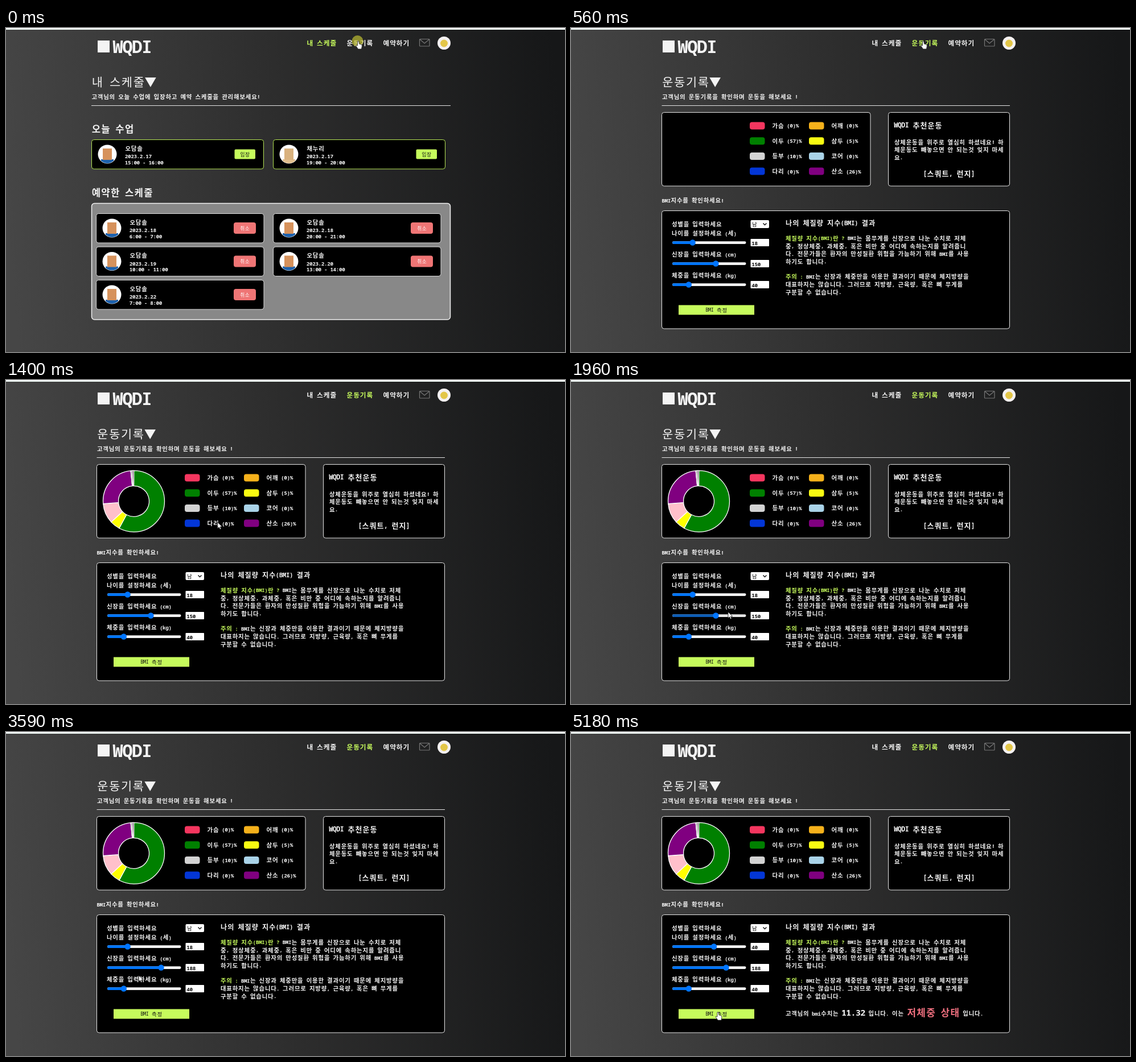
An HTML page with a canvas that plays this animation: 982 by 570 pixels, repeating every 5310 ms.

```html
<!DOCTYPE html>
<html lang="ko">
<head>
<meta charset="utf-8">
<title>운동기록</title>
<style>
html, body { margin: 0; width: 100%; height: 100%; overflow: hidden; background: #2c2c2c; }
canvas { display: block; width: 982px; height: 570px; }
</style>
</head>
<body>
<canvas id="stage" width="982" height="570"></canvas>
<script>
const LOOP = 5310, LOADED = 560;
const LIME = '#c6fb5c', WHITE = '#f4f4f4', BLUE = '#0075ff', EDGE = '#e6e6e6';
const CJK = '"Noto Sans Mono CJK KR", "Noto Sans CJK KR", "Noto Sans CJK", sans-serif';
const MONO = '"Noto Sans Mono", "DejaVu Sans Mono", monospace';
const BRAND = 'WQDI';
const ctx = document.getElementById('stage').getContext('2d');

// ---------- helpers ----------
// Text on a cell grid: wide glyphs take one cell, Latin half a cell. Returns the end x.
function text(s, x, cy, cell = 10.4, color = WHITE, weight = cell < 20 ? 700 : 400) {
  ctx.fillStyle = color;
  ctx.textAlign = 'center';
  for (const ch of s) {
    const wide = ch > '\u2000';
    const step = wide ? cell : cell / 2;
    ctx.font = wide ? `${weight} ${cell}px ${CJK}` : `${weight} ${cell * 0.9}px ${MONO}`;
    ctx.fillText(ch, x + step / 2, cy + cell * (wide ? 0.37 : 0.33));
    x += step;
  }
  return x;
}

function lines(rows, x, cy, gap) {
  rows.forEach((row, i) => text(row, x, cy + i * gap));
}

function rect(x, y, w, h, fill) {
  ctx.fillStyle = fill;
  ctx.fillRect(x, y, w, h);
}

function box(x, y, w, h, r, fill, stroke, line = 1) {
  ctx.beginPath();
  ctx.roundRect(x, y, w, h, r);
  if (fill) { ctx.fillStyle = fill; ctx.fill(); }
  if (stroke) { ctx.strokeStyle = stroke; ctx.lineWidth = line; ctx.stroke(); }
}

function disc(x, y, r, fill) {
  ctx.beginPath();
  ctx.arc(x, y, r, 0, Math.PI * 2);
  ctx.fillStyle = fill;
  ctx.fill();
}

function shape(d, fill, stroke, line = 1) {
  const p = new Path2D(d);
  if (fill) { ctx.fillStyle = fill; ctx.fill(p); }
  ctx.strokeStyle = stroke;
  ctx.lineWidth = line;
  ctx.stroke(p);
}

// ---------- shared chrome ----------
function backdrop() {
  const g = ctx.createLinearGradient(0, 330, 982, 240);
  g.addColorStop(0, '#464646');
  g.addColorStop(0.5, '#2d2d2d');
  g.addColorStop(1, '#161718');
  rect(0, 0, 982, 570, g);
  rect(0, 0, 982, 3, '#f0faf5');
}

function header(active) {
  rect(161, 22, 21, 21, WHITE);
  text(BRAND, 188, 33, 34, WHITE, 900);
  [['내 스케줄', 528], ['운동기록', 598], ['예약하기', 662]].forEach(([label, x], i) =>
    text(label, x, 26.5, 11.7, i === active ? LIME : WHITE));
  box(726.5, 19.5, 17.5, 12.5, 1, null, '#777', 1.2);
  shape('M727 20l8.2 7 8.3-7', null, '#777', 1.2);
  disc(769.5, 26.5, 11.5, '#f5f1f1');
  disc(769.5, 27, 6.5, '#e3c648');
}

function heading(title, sub, x, right) {
  text(title, x, 95, 20.8);
  text(sub, x, 121);
  rect(x, 136, right - x, 1, '#e4e4e4');
}

// ---------- schedule page ----------
function portrait(x, y, skin, shirt) {
  disc(x, y, 16.5, '#fff');
  ctx.save();
  ctx.beginPath();
  ctx.arc(x, y, 16, 0, 7);
  ctx.clip();
  rect(x - 11, y + 9, 22, 8, shirt);
  rect(x - 8, y - 10, 16, 20, skin);
  ctx.restore();
}

function lesson(x, y, w, who, date, hours, opt) {
  box(x + 0.5, y + 0.5, w, 51.5, 4, '#000', opt.edge);
  const face = x + opt.inset, btn = x + w - opt.bw - opt.pad;
  if (who === '오담솔') portrait(face, y + 26, '#d6925c', '#1e62ad');
  else portrait(face, y + 26, '#d9b27e', '#e2bf8e');
  text(who, face + 31, y + 16);
  text('2023.2.' + date, face + 31, y + 30);
  text(hours, face + 31, y + 40.5);
  box(btn, y + 26 - opt.bh / 2, opt.bw, opt.bh, opt.r, opt.color);
  text(opt.label, btn + opt.bw / 2 - 8.7, y + 26.5, 8.7, opt.ink, 400);
}

function schedulePage() {
  backdrop();
  header(0);
  heading('내 스케줄▼', '고객님의 오늘 수업에 입장하고 예약 스케줄을 관리해보세요!', 150, 781);
  text('오늘 수업', 150, 178, 16.64);
  const enter = { edge: '#b5e455', inset: 28, pad: 14, bw: 36.5, bh: 17, r: 2, color: LIME, label: '입장', ink: '#111' };
  lesson(150, 196, 302, '오담솔', '17', '15:00 - 16:00', enter);
  lesson(469, 196, 302, '채누리', '17', '19:00 - 20:00', enter);

  text('예약한 스케줄', 150, 290, 16.64);
  box(150.5, 308.5, 630, 204.5, 5, '#888', '#f0f0f0', 1.5);
  const cancel = { edge: '#dcdcdc', inset: 28, pad: 13.5, bw: 39, bh: 20, r: 4, color: '#ef7575', label: '취소', ink: '#fff' };
  [['18', '6:00 - 7:00'], ['18', '20:00 - 21:00'], ['19', '10:00 - 11:00'],
    ['20', '13:00 - 14:00'], ['22', '7:00 - 8:00']].forEach(([day, hours], i) =>
    lesson(i % 2 ? 469 : 158, 326 + (i >> 1) * 58.5, 294.5, '오담솔', day, hours, cancel));
}

// ---------- record page ----------
function donut(t) {
  const u = Math.min(1, (t - LOADED) / 900);
  const grow = 1 - Math.pow(1 - u, 4.4);
  if (grow < 0.02) return;
  const slices = { green: 11, yellow: 1, pink: 2, purple: 4.7, gray: 0.15, '#4b2a4b': 0.15 };
  const turn = Math.PI * 2 * grow / 19;
  let a = -Math.PI / 2;
  ctx.strokeStyle = '#fff';
  ctx.lineWidth = 1.3;
  for (const [color, count] of Object.entries(slices)) {
    const b = a + count * turn;
    ctx.beginPath();
    ctx.arc(224.5, 213.3, 54, a, b);
    ctx.arc(224.5, 213.3, 27, b, a, true);
    ctx.closePath();
    ctx.fillStyle = color;
    ctx.fill();
    ctx.stroke();
    a = b;
  }
}

function chartPanel(t, ready) {
  box(159.5, 148.5, 366.5, 129.5, 4, '#000', EDGE);
  const legend = [['가슴', 0, '#f4365f'], ['어깨', 0, '#f5b11b'], ['이두', 57, 'green'], ['삼두', 5, '#f8fb12'],
    ['등부', 10, ready ? 'lightgray' : '#f0c4ca'], ['코어', 0, '#a9d3e8'], ['다리', 0, '#0336d6'], ['산소', 26, 'purple']];
  legend.forEach(([name, share, color], i) => {
    const x = 314 + (i % 2) * 104, cy = 172 + (i >> 1) * 26.7;
    box(x, cy - 6.5, 26.5, 13, 4, color);
    text(ready ? `${name} (${share})%` : name, x + 39, cy, 10.5);
  });
  if (ready) donut(t);
}

function advicePanel(ready) {
  const [done, next] = ready ? '상하' : '하상';
  box(557.5, 148.5, 213, 129.5, 4, '#000', EDGE);
  text(BRAND + ' 추천운동', 567.5, 171, 13);
  lines([`${done}체운동을 위주로 열심히 하셨네요! ${next}`, '체운동도 빼놓으면 안 되는것 잊지 마세', '요.'], 567.5, 201, 13.5);
  if (ready) text('[스쿼트, 런지]', 618.5, 256, 13);
  else text('[팔굽혀펴기, 풀업]', 605.5, 256, 13);
}

function slider(label, cy, value, max, hover) {
  text(label, 176.5, cy - 16);
  const x = 183 + value / max * 119;
  box(178, cy - 2.2, 129.5, 4.6, 2.3, hover ? '#e4e4e4' : '#f2f2f2');
  box(178, cy - 2.2, x - 178, 4.6, 2.3, hover ? '#0b5cb5' : BLUE);
  disc(x, cy, 5.2, BLUE);
  box(315.5, cy - 6.5, 32.5, 13, 1, '#fff');
  text(String(value), 317.5, cy + 1, 10.4, '#111');
}

function bmiPanel(t, mouse) {
  box(159.5, 321.5, 611, 207.5, 4, '#000', EDGE);
  text('성별을 입력하세요', 176.5, 345);
  box(315.5, 338, 32.5, 14, 2, '#fff');
  text('남', 317.5, 345, 9.5, '#111', 400);
  shape('M337.5 343.5l3 3 3-3', null, '#111', 1.5);

  const over = cy => t > 1400 && mouse.x > 178 && mouse.x < 308 && Math.abs(mouse.y - cy) < 8;
  const dragged = ([from, to], idle, max) =>
    t < from ? idle : Math.round((path(Math.min(t, to)).x - 183) / 119 * max);
  slider('나이를 설정하세요 (세)', 377.5, dragged([3790, 4060], 18, 70), 70, over(377.5));
  slider('신장을 입력하세요 (cm)', 414.5, dragged([2290, 2690], 150, 250), 250, over(414.5));
  slider('체중을 입력하세요 (kg)', 451.5, 40, 200, over(451.5));
  rect(189, 487.5, 133, 17, LIME);
  text('BMI 측정', 236.5, 496, 9.5, '#111', 400);

  const x = 376.5;
  text('나의 체질량 지수(BMI) 결과', x, 343, 12.17);
  text(' BMI는 몸무게를 신장으로 나눈 수치로 저체', text('체질량 지수(BMI)란 ?', x, 370, 10.4, LIME), 370);
  lines(['중, 정상체중, 과체중, 혹은 비만 중 어디에 속하는지를 알려줍니',
    '다. 전문가들은 환자의 만성질환 위험을 가늠하기 위해 BMI를 사용', '하기도 합니다.'], x, 383.7, 13.6);
  text(' BMI는 신장과 체중만을 이용한 결과이기 때문에 체지방량을', text('주의 :', x, 437.5, 10.4, LIME), 437.5);
  lines(['대표하지는 않습니다. 그러므로 지방량, 근육량, 혹은 뼈 무게를', '구분할 수 없습니다.'], x, 451.2, 13.6);

  if (t >= 5040) {
    let end = text('고객님의 bmi수치는 ', x, 495.5);
    end = text('11.32', end, 494, 16.64);
    end = text(' 입니다. 이는 ', end, 495.5);
    end = text('저체중 상태', end, 494, 16.9, '#f0707f');
    text(' 입니다.', end, 495.5);
  }
}

// ---------- loading ghost, built from rows of square pixels ----------
const PX = 4;
const snap = v => Math.round(v / PX) * PX;
const span = (a, b, y, fill) => rect(snap(a), y, snap(b) - snap(a), PX, fill);

function oval(cx, cy, rx, ry, fill) {
  for (let y = snap(cy - ry); y < cy + ry; y += PX) {
    const half = rx * Math.sqrt(Math.max(0, 1 - ((y + PX / 2 - cy) / ry) ** 2));
    span(cx - half, cx + half, y, fill);
  }
}

// Left and right edge of the ghost: round head, raised arm, widening train.
function ghostEdges(y) {
  if (y < 254) {
    const half = 43 * Math.sqrt(Math.max(0.1, 1 - ((254 - y) / 48) ** 2));
    return [455 - half, 455 + half];
  }
  const arm = y < 292 ? 19 * Math.sqrt(Math.sin(Math.PI * (y - 252) / 42)) : 0;
  return [407 + (y - 254) / 18 - arm, 498 + 39 * ((y - 254) / 92) ** 2.2];
}

function ghost(bob) {
  const ink = '#666';
  ctx.save();
  ctx.translate(0, bob);
  for (let y = 208; y < 348; y += PX) {
    const [l, r] = ghostEdges(y);
    const [l0, r0] = ghostEdges(Math.max(208, y - PX));
    const front = r - 18 - (y - 208) / 5;
    span(l, r, y, y === 208 || y === 344 ? ink : '#c8c8c8');
    if (y > 208 && y < 344) {
      span(l, front, y, '#fff');
      span(Math.min(l, l0 - PX), Math.max(l, l0) + PX, y, ink);
      span(Math.min(r, r0) - PX, r, y, ink);
    }
  }
  rect(408, 256, PX, 32, '#bbb');
  oval(470, 268, 20, 14, ink);
  oval(470, 269, 16, 10, '#fff');
  for (let y = 276; y < 312; y += PX) {
    span(460 + (y - 276) / 4, 476, y, '#d8d8d8');
    span(458 + (y - 276) / 4, 462 + (y - 276) / 4, y, ink);
  }
  rect(412, 324, 32, 20, ink);
  rect(416, 328, 24, 8, '#999');
  rect(420, 236, 10, 12, '#000');
  rect(444, 236, 10, 12, '#000');
  rect(454, 240, 4, 8, '#000');
  rect(430, 257, 10, PX, '#000');
  ctx.restore();
}

function loading(t) {
  rect(0, 3, 982, 567, 'rgba(48,48,48,.14)');
  oval(476, 379, 60, 13, '#484848');
  ghost(t < 350 ? 0 : snap(PX * Math.sin((t - 350) / 130)));
  text('LOADING', 412.5, 411, 32, '#fff', 800);
}

function recordPage(t, mouse) {
  const ready = t >= LOADED;
  backdrop();
  header(1);
  heading('운동기록▼', '고객님의 운동기록을 확인하며 운동을 해보세요 !', 159.5, 771);
  chartPanel(t, ready);
  advicePanel(ready);
  text('BMI지수를 확인하세요!', 159.5, 303.5);
  bmiPanel(t, mouse);
  if (!ready) loading(t);
}

// ---------- pointer ----------
// Each stop: arrival time, place, and how long the pointer rests there.
const STOPS = [
  { at: 0, x: 617.5, y: 23, rest: 1050 },
  { at: 1400, x: 372, y: 250, rest: 0 },
  { at: 1960, x: 276, y: 408, rest: 60 },
  { at: 2090, x: 270, y: 417, rest: 200 },
  { at: 2690, x: 272.5, y: 417, rest: 200 },
  { at: 2960, x: 272, y: 438, rest: 0 },
  { at: 3170, x: 262, y: 498, rest: 120 },
  { at: 3790, x: 214, y: 382, rest: 0 },
  { at: 4060, x: 251, y: 381, rest: 140 },
  { at: 4560, x: 257, y: 422, rest: 0 },
  { at: 4980, x: 257, y: 493, rest: LOOP }
];
const PRESSES = [[0, 70], [2290, 2690], [3790, 4130], [5000, 5180]];

function path(t) {
  const i = STOPS.findLastIndex(s => s.at <= t);
  const from = STOPS[i], to = STOPS[i + 1] || from;
  const leave = from.at + from.rest;
  const u = t <= leave ? 0 : (t - leave) / (to.at - leave);
  return { x: from.x + (to.x - from.x) * u, y: from.y + (to.y - from.y) * u };
}

function pointer(t, { x, y }) {
  if (PRESSES.some(([a, b]) => t >= a && t < b)) disc(x, y, 10, 'rgba(190,190,50,.7)');
  const onLink = y < 33 && (t < 70 || t >= LOADED);
  const onButton = y > 487 && y < 505;
  const onLabel = t > 2900 && x > 176 && x < 292 && Math.abs(y - 436) < 6;
  ctx.save();
  ctx.translate(x, y);
  if (onLink || onButton) shape('M0 0h2l1 5 4 1 1 2-1 6H1L-3 8l1-1 2 1z', '#fff', '#222', 0.8);
  else if (onLabel) shape('M-2-4.5h4M0-4.5V6M-2 6h4', null, '#ddd');
  else shape('M0 0v11l2.5-2.3 1.7 3.8 1.8-.8L4.4 8l3.3-.2z', '#fff', '#111', 0.8);
  ctx.restore();
}

// ---------- loop ----------
const start = performance.now();
function draw() {
  const t = (performance.now() - start) % LOOP;
  const mouse = path(t);
  if (t < 70) schedulePage();
  else recordPage(t, mouse);
  pointer(t, mouse);
  requestAnimationFrame(draw);
}
draw();
</script>
</body>
</html>
```
